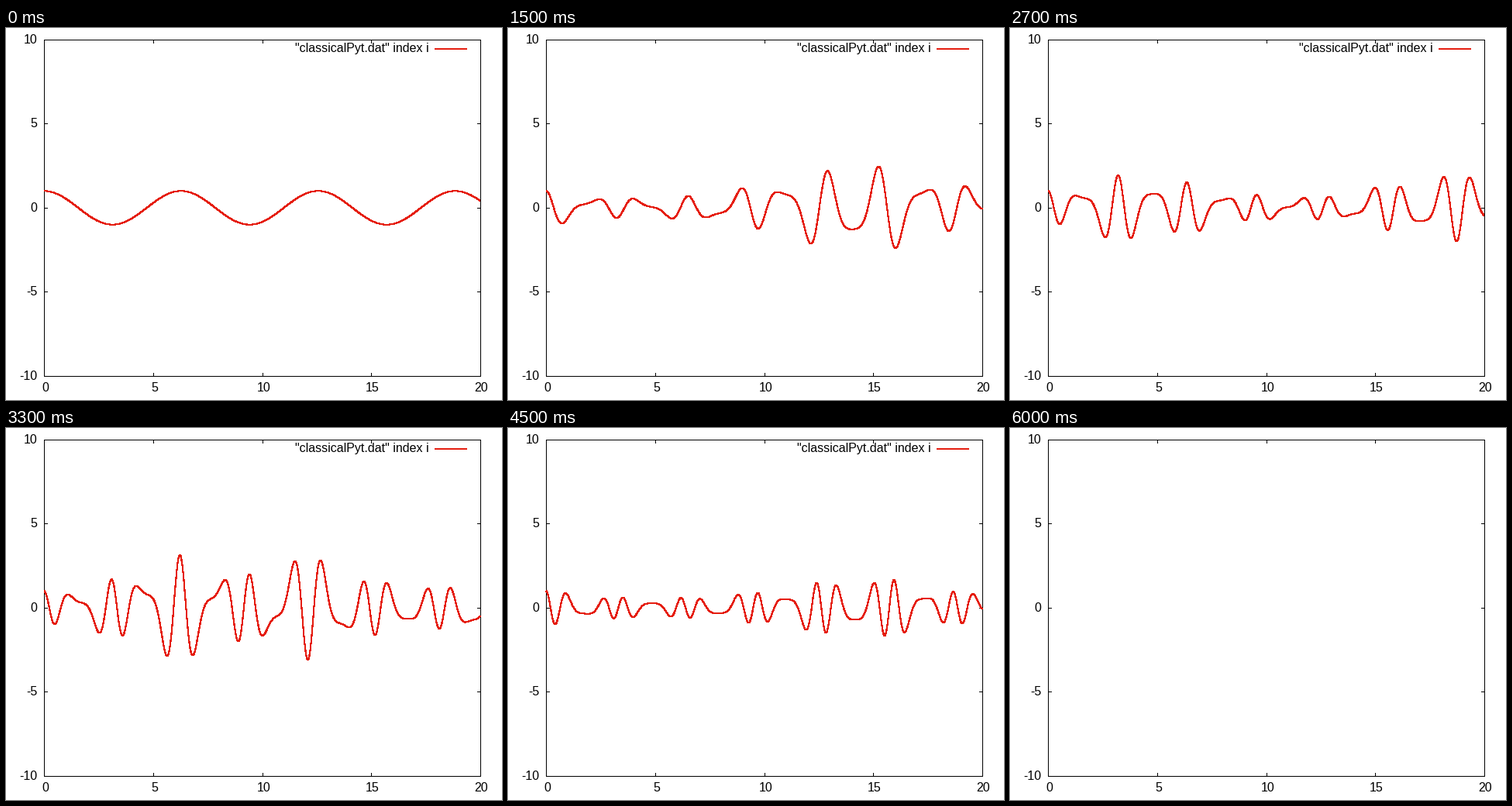
Write a matplotlib script that moves like this. It is 640 px wide and 480 px high and loops after 6.3 s.

```python
import numpy as np
import matplotlib.pyplot as plt
from matplotlib.animation import FuncAnimation

W, H, DPI = 640, 480, 80
PX = 72 / DPI                       # points per pixel
LEFT, RIGHT, TOP, BOTTOM = 49, 612, 15, 449
RED = "#e51e10"
RUNS, FRAMES, INTERVAL = 20, 21, 300
T_END, STEPS = 20.0, 8000

plt.rcParams["font.family"] = "Liberation Sans"


# Plot values land on whole pixels, which gives the crisp stepped strokes.
def col(t):
    return np.floor(LEFT + (RIGHT - LEFT) * t / 20 + 0.5)


def row(v):
    return np.ceil((TOP + BOTTOM) / 2 - (BOTTOM - TOP) * v / 20 - 0.5)


# Two oscillators with an x^2 y^2 coupling that grows from run to run.
coupling = 0.1 * np.arange(RUNS)


def deriv(s):
    x, y, px, py = s
    return np.array([px, py,
                     -x * (1 + coupling * y * y),
                     -y * (1 + coupling * x * x)])


def solve():
    """Momentum py(t) for every coupling, by fourth-order Runge-Kutta."""
    h = T_END / STEPS
    s = np.outer([6.0, 0.0, 1.0, 1.0], np.ones(RUNS))
    out = np.empty((STEPS + 1, RUNS))
    out[0] = s[3]
    for n in range(STEPS):
        k1 = deriv(s)
        k2 = deriv(s + h / 2 * k1)
        k3 = deriv(s + h / 2 * k2)
        k4 = deriv(s + h * k3)
        s = s + h / 6 * (k1 + 2 * k2 + 2 * k3 + k4)
        out[n + 1] = s[3]
    return out


curve_x = col(np.linspace(0, T_END, STEPS + 1))
curve_y = row(solve())

fig = plt.figure(figsize=(W / DPI, H / DPI), dpi=DPI, facecolor="white")
ax = fig.add_axes([0, 0, 1, 1])
ax.set_xlim(0, W)
ax.set_ylim(H, 0)
ax.axis("off")


def stroke(xs, ys, color="black", width=1, cap="projecting", **kw):
    return ax.plot(xs, ys, color=color, lw=width * PX, antialiased=False,
                   solid_capstyle=cap, solid_joinstyle="miter", **kw)[0]


def label(x, y, text, ha):
    return ax.text(x, y, text, ha=ha, va="baseline", fontsize=16 * PX,
                   color="black")


for x in (LEFT, RIGHT):
    stroke([x, x], [TOP, BOTTOM])
for y in (TOP, BOTTOM):
    stroke([LEFT, RIGHT], [y, y])

for v in range(0, 21, 5):
    x = col(v)
    label(x + 1.5, 469, str(v), "center")
    stroke([x, x], [BOTTOM, BOTTOM - 4])
    stroke([x, x], [TOP, TOP + 4])

for v in range(-10, 11, 5):
    y = row(v)
    label(40.4, y + 5, str(v), "right")
    stroke([LEFT, LEFT + 4], [y, y])
    stroke([RIGHT, RIGHT - 4], [y, y])

key_text = label(546, 31, '"classicalPyt.dat" index i', "right")
key_line = stroke([553, 595], [27, 27], RED, 2, "butt")
curve = stroke([], [], RED, 2, "butt", zorder=5)


def update(i):
    shown = i < RUNS
    for artist in (key_text, key_line, curve):
        artist.set_visible(shown)
    if shown:
        curve.set_data(curve_x, curve_y[:, i])
    return key_text, key_line, curve


anim = FuncAnimation(fig, update, frames=FRAMES, interval=INTERVAL,
                     repeat=True, repeat_delay=0, blit=False)
plt.show()
```
